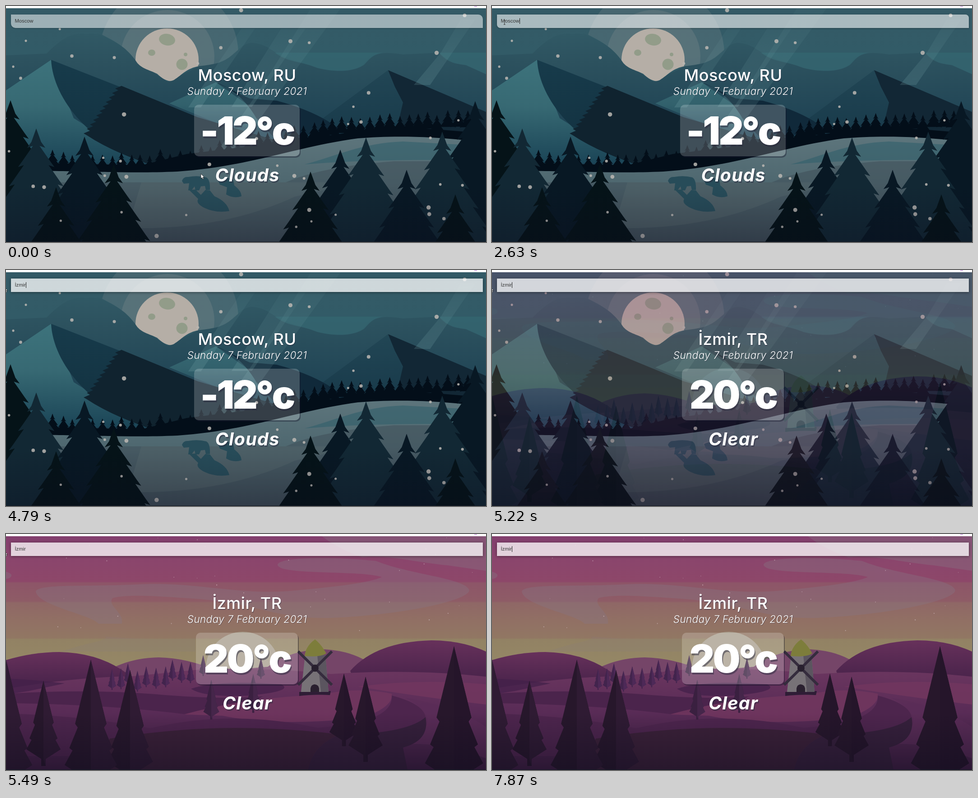
An HTML page for the animation above (8130 ms loop, 1064x526 px).

```html
<!DOCTYPE html>
<html lang="en">
<head>
<meta charset="utf-8">
<title>Weather search</title>
<style>
  html, body { margin: 0; width: 100%; height: 100%; overflow: hidden; background: #fff; }
  #stage { position: relative; width: 1064px; height: 526px; overflow: hidden; }
  svg { position: absolute; left: 0; top: 0; }
  #search {
    position: absolute; left: 11px; top: 19px; width: 1046px; height: 29.5px;
    box-sizing: border-box; padding: 8px 0 0 8.5px; display: flex;
    font: 11.2px/13px "Liberation Sans", Arial, sans-serif; color: #333;
  }
  #query { height: 13px; white-space: pre; }
  #query.picked { background: #0078d7; color: #fff; }
  #caret { width: 1px; height: 13px; background: #222; }
  #panel {
    position: absolute; top: 220px; height: 115px; border-radius: 10px;
    background: rgba(255,255,255,.2); box-shadow: 2px 3px rgba(20,20,40,.38);
  }
  text { font-family: Inter, "Open Sans", sans-serif; fill: #fff; text-anchor: middle; font-optical-sizing: none; }
  #city { font-size: 36px; font-weight: 500; letter-spacing: .5px; filter: drop-shadow(1.5px 2px 0 rgba(40,40,60,.45)); }
  #date { font-size: 22.5px; font-weight: 300; font-style: italic; letter-spacing: .4px; filter: drop-shadow(1px 1.5px 0 rgba(40,40,60,.4)); }
  #temp { font-size: 86px; font-weight: 900; letter-spacing: -4px; filter: drop-shadow(2px 4px 0 rgba(40,40,60,.5)); }
  #sky { font-size: 39.5px; font-weight: 700; font-style: italic; letter-spacing: 1.2px; filter: drop-shadow(2px 3px 0 rgba(40,40,60,.5)); }
</style>
</head>
<body>
<div id="stage">
<svg width="1064" height="526" viewBox="0 0 1064 526">
  <defs>
    <linearGradient id="night" x2="0" y2="1">
      <stop offset="0" stop-color="#345a66"/><stop offset=".2" stop-color="#325b67"/><stop offset=".55" stop-color="#234a5a"/>
    </linearGradient>
    <linearGradient id="ridge" gradientUnits="userSpaceOnUse" x1="0" y1="60" x2="0" y2="290">
      <stop offset="0" stop-color="#315965"/><stop offset=".3" stop-color="#2c515e"/><stop offset="1" stop-color="#1c4052"/>
    </linearGradient>
    <linearGradient id="lit" x2="0" y2="1">
      <stop offset="0" stop-color="#3d737c"/><stop offset=".45" stop-color="#376973"/><stop offset="1" stop-color="#1b4557"/>
    </linearGradient>
    <linearGradient id="slope" x2="0" y2="1">
      <stop offset="0" stop-color="#173b4b"/><stop offset="1" stop-color="#12303f"/>
    </linearGradient>
    <linearGradient id="snow" x2="0" y2="1">
      <stop offset="0" stop-color="#5d757c"/><stop offset=".42" stop-color="#4f6870"/><stop offset="1" stop-color="#3b4a54"/>
    </linearGradient>
    <linearGradient id="beam" x2="0" y2="1">
      <stop offset="0" stop-color="#8ebfc0" stop-opacity=".04"/><stop offset="1" stop-color="#8ebfc0" stop-opacity=".17"/>
    </linearGradient>
    <linearGradient id="dusk" gradientUnits="userSpaceOnUse" x1="0" y1="5" x2="0" y2="320">
      <stop offset="0" stop-color="#833f6e"/><stop offset=".14" stop-color="#8a456d"/><stop offset=".32" stop-color="#8d4769"/>
      <stop offset=".33" stop-color="#8d5568"/><stop offset=".46" stop-color="#8e5c66"/><stop offset=".47" stop-color="#8f6766"/>
      <stop offset=".6" stop-color="#917064"/><stop offset=".72" stop-color="#917763"/><stop offset=".73" stop-color="#928264"/>
      <stop offset="1" stop-color="#968a66"/>
    </linearGradient>
    <linearGradient id="hill" x2="0" y2="1">
      <stop offset="0" stop-color="#67315b"/><stop offset=".6" stop-color="#4f264e"/><stop offset="1" stop-color="#432046"/>
    </linearGradient>
    <linearGradient id="field" x2="0" y2="1">
      <stop offset="0" stop-color="#6b365f"/><stop offset=".4" stop-color="#5a2c57"/><stop offset="1" stop-color="#402043"/>
    </linearGradient>
    <linearGradient id="shade" gradientUnits="userSpaceOnUse" x1="0" y1="400" x2="0" y2="526">
      <stop offset="0" stop-color="#0b0a1c" stop-opacity="0"/><stop offset="1" stop-color="#0b0a1c" stop-opacity=".4"/>
    </linearGradient>
    <clipPath id="view"><rect y="5" width="1064" height="521"/></clipPath>
    <clipPath id="aboveRidge"><path d="M0,5V60H205C250,82 268,95 287,121C298,140 318,142 335,151Q358,173 372,165C392,152 400,139 428,134Q450,132 470,127C500,116 500,108 530,86V5Z"/></clipPath>
  </defs>

  <g clip-path="url(#view)">
    <g id="winter">
      <rect y="5" width="1064" height="521" fill="url(#night)"/>
      <path fill="url(#ridge)" d="M0,110L90,106Q130,64 160,62H205C250,82 268,95 287,121L358,169L428,134Q450,132 470,127C500,116 500,105 530,86Q548,76 580,92C620,120 650,122 690,138C740,150 785,145 800,122C820,100 850,104 880,108L960,104C980,130 1000,128 1020,132L1064,152V400H0Z"/>
      <path fill="#356872" opacity=".65" d="M596,104H838C815,106 806,118 795,130C770,150 720,146 690,138C650,122 625,126 596,104ZM960,104H1064V152L1020,132C1000,128 985,130 960,104Z"/>
      <g clip-path="url(#aboveRidge)">
        <g fill="#c9bcb2" fill-opacity=".13"><circle cx="361" cy="107" r="154"/><circle cx="358" cy="113" r="104"/></g>
        <circle cx="357" cy="120" r="70" fill="#b5aea6"/>
        <g fill="#929c89"><ellipse cx="357" cy="75" rx="18" ry="13" transform="rotate(10 357 75)"/><ellipse cx="323" cy="104" rx="8" ry="7"/><circle cx="398" cy="108" r="4"/><circle cx="390" cy="130" r="12.5"/></g>
      </g>
      <path fill="url(#slope)" opacity=".45" d="M847,143L700,252V320H960Z"/>
      <path fill="#122735" d="M847,143L1064,236V330H860L872,250L880,215L862,180Z"/>
      <path fill="url(#lit)" opacity=".75" d="M465,170L362,217L470,262L620,280Z"/>
      <path fill="#10293a" d="M465,170Q520,190 555,250L600,300L740,275Q690,235 600,211L540,206Z"/>
      <path fill="url(#lit)" d="M100,120L0,188V350H310L150,250Z"/>
      <path fill="url(#slope)" d="M100,120C104,200 175,300 310,350H600V300L425,248Z"/>
      <path id="facet" fill="#10232f"/>
      <g fill="url(#beam)"><path d="M522,50H552L432,226H404Z"/><path d="M676,5H742L520,310L458,340L560,190Z"/><path d="M610,50H664L545,225H500Z"/><path d="M964,104L1008,30H1040L940,176H904Z"/></g>
      <g id="forest" fill="#030e19"><path d="M90,350L300,355L400,330L560,310L700,290L870,268L1064,284V400H90Z"/></g>
      <path fill="url(#snow)" d="M0,367C200,367 260,374 380,369C540,358 640,314 780,295C860,288 960,290 1064,305V526H0Z"/>
      <path fill="#31606b" opacity=".6" d="M662,353C730,335 790,305 880,302L1064,312V344Q820,340 662,353Z"/>
      <path fill="#42545d" opacity=".65" d="M0,393H620Q700,358 860,346H1064V526H0Z"/>
      <path fill="#52656b" opacity=".55" d="M270,495Q480,500 640,425L780,393H300Z"/>
      <g fill="#274c59">
        <path d="M390,390Q393,380 404,381Q425,377 444,382Q453,387 452,410H443L441,401L432,402L428,411H420L418,402L411,411H404L406,395L394,396Z"/>
        <path d="M406,410L420,409L432,421L442,410L452,411L462,424Q490,436 495,457Q465,462 440,450Q420,440 426,430Z"/>
        <path d="M470,388Q490,378 504,388L506,400Q522,412 522,424Q505,430 488,420L490,404L474,398Z"/>
      </g>
      <g id="pines"></g>
      <g id="flakes" fill="#bab7b2" fill-opacity=".86"></g>
      <rect y="400" width="1064" height="126" fill="url(#shade)" opacity=".7"/>
    </g>

    <g id="summer">
      <rect y="5" width="1064" height="521" fill="url(#dusk)"/>
      <g fill="#867684" fill-opacity=".36">
        <path d="M66,128C72,110 190,118 300,112C420,106 520,138 640,126C740,116 800,110 833,96C790,82 650,90 610,76Q590,66 620,59C680,48 780,56 820,60C900,92 1020,98 1027,126C1020,152 860,182 720,187C590,190 560,152 400,143C320,137 260,135 236,143C224,160 262,174 257,200H205C190,180 70,160 66,128Z"/>
        <path d="M790,52C850,46 900,62 980,70L1064,82V5H700Q740,35 790,52Z"/>
        <path d="M0,84Q14,88 12,94Q8,100 0,100Z"/><path d="M175,246Q240,232 215,228Q300,236 420,233V262H120Z" opacity=".45"/>
      </g>
      <g id="stars" fill="#d8c3c9" opacity=".65"></g>
      <circle cx="525" cy="300" r="82" fill="#aaa08f"/>
      <path fill="#754568" d="M215,310Q270,276 338,275Q400,276 470,305L580,296Q630,258 705,257Q790,262 830,310V345H215Z"/>
      <path fill="url(#hill)" d="M0,281Q60,263 118,263Q220,265 285,325L200,360H0Z"/>
      <path fill="url(#hill)" d="M763,305Q820,240 943,237Q1010,237 1064,262V350H780Z"/>
      <path fill="url(#field)" d="M0,345Q160,318 280,317L430,302Q570,296 720,312Q900,300 1064,318V526H0Z"/>
      <path fill="#43214a" opacity=".75" d="M0,322Q70,325 130,333L50,350L0,358ZM410,345Q470,325 610,335Q640,350 540,360Q440,365 410,345Z"/>
      <path fill="#4b244c" d="M0,356Q180,345 330,357Q480,370 570,362Q500,395 400,402Q230,380 0,377Z"/>
      <path fill="#71375f" opacity=".85" d="M395,402Q520,366 700,358Q780,340 855,356Q860,385 790,410Q600,430 480,405ZM780,340Q920,322 1064,335V380Q930,365 780,340Z"/>
      <path fill="#4d254d" d="M0,400Q170,405 320,433Q500,390 690,432Q860,420 855,360Q950,385 925,430Q890,470 720,495H0Z"/>
      <path fill="#5b2d57" opacity=".7" d="M885,365Q1000,385 1064,430V500Q960,460 870,470Q990,420 885,365Z"/>
      <path fill="#3b2138" d="M230,456Q400,428 560,433Q660,436 740,447Q680,470 670,526H200Z"/>
      <path fill="#36203b" d="M740,447Q890,445 930,408Q940,460 880,476L890,526H670Q680,470 740,447Z"/>
      <g id="grove"></g>
      <path fill="#2f1d36" d="M650,352L720,350L718,359Q680,357 650,361Z"/>
      <path fill="#777277" d="M663,270H708L715,352H654Z"/>
      <path fill="#5b555f" d="M690,270H708L715,352H698Z"/>
      <path fill="#7d7d3b" d="M685,235Q698,245 710,266Q698,275 662,272Q664,250 685,235Z"/>
      <path fill="#2a202f" d="M675,352V344Q676,336 684,335Q693,336 694,344V352Z"/>
      <g id="sails" fill="#352c3d"></g>
      <circle cx="685" cy="299" r="8" fill="#28202e"/>
      <g id="cypresses"></g>
      <rect y="400" width="1064" height="126" fill="url(#shade)"/>
    </g>
  </g>
  <rect y="525" width="1064" height="1" fill="#111722"/>
  <rect x="1038" width="6" height="1" fill="#b36ad0"/>
</svg>

<div id="search"><span id="query"></span><i id="caret"></i></div>
<div id="panel"></div>

<svg width="1064" height="526" viewBox="0 0 1064 526">
  <text id="city" x="534.5" y="167"></text>
  <text id="date" x="534.5" y="197.5">Sunday 7 February 2021</text>
  <text id="temp" x="534" y="309"></text>
  <text id="sky" x="535" y="391"></text>
  <path id="arrow" d="M0,0V10.5L2.5,8.3L4.2,12L6,11.2L4.4,7.6H7.6Z" fill="#fff" stroke="#111" stroke-width=".7"/>
  <path id="ibeam" d="M-2,-4.5H2M0,-4.5V4.5M-2,4.5H2" stroke="#333" fill="none"/>
</svg>
</div>

<script>
const LOOP = 8130;
const $ = id => document.getElementById(id);
const clamp = v => Math.min(1, Math.max(0, v));
const smooth = v => (v = clamp(v), v * v * (3 - 2 * v));

function add(parent, tag, attrs) {
  const el = document.createElementNS('http://www.w3.org/2000/svg', tag);
  for (const k in attrs) el.setAttribute(k, attrs[k]);
  $(parent).append(el);
}

let seed = 7;
const rand = (lo = 0, hi = 1) => lo + (hi - lo) * ((seed = seed * 16807 % 2147483647) / 2147483647);

function scatter(parent, count, bottom, radius) {
  for (let i = 0; i < count; i++)
    add(parent, 'circle', { cx: rand(5, 1060), cy: rand(8, bottom), r: radius() });
}

// Mirrors a right-hand outline of [dx, y] points around a vertical axis.
function mirrored(x, side) {
  const right = side.map(([dx, y]) => [x + dx, y]);
  const left = side.map(([dx, y]) => [x - dx, y]).reverse();
  return right.concat(left).map(p => p.map(n => n.toFixed(1))).join(' ');
}

// A conifer that widens at a constant rate, in tiers of equal height.
function pine(parent, x, y, tier, bottom, fill) {
  const side = [[0, y]];
  for (let foot = y + tier; foot < bottom + tier; foot += tier) {
    const reach = .47 * (foot - y);
    side.push([reach - tier * .22, foot - tier * .3], [reach, foot], [reach - tier * .3, foot - tier * .1]);
  }
  add(parent, 'polygon', { points: mirrored(x, side), fill });
}

function cypress(parent, x, y, h, dark, light) {
  const side = [[0, 0], [.6, .53], [.5, .56], [.82, .73], [.7, .75], [1, .87], [.13, .99], [.13, 1.08]]
    .map(([a, b]) => [a * h * .215, y + b * h]);
  add(parent, 'polygon', { points: mirrored(x, side), fill: dark });
  const half = side.map(([dx, v]) => [x + dx, v]).concat([[x, y + h]]);
  add(parent, 'polygon', { points: half.join(' '), fill: light });
}

// Winter
let edge = 'M256,178';
for (let i = 0; i < 11; i++) edge += 'l-14,6l7,4';
$('facet').setAttribute('d', edge + 'Q230,322 310,350H600V300L425,248Z');

for (let x = 103; x < 1060; x += rand(18, 25)) {
  const y = 328 - 90 * smooth((x - 270) / 600) + rand(-8, 8);
  pine('forest', x, y, 13, y + 39, '#030e19');
}

const stand = (fill, ...tips) => tips.forEach(([x, y]) => pine('pines', x, y, 43, 526, fill));
stand('#051318', [10, 210]);
stand('#081824', [1040, 212], [741, 320]);
stand('#122834', [67, 273], [798, 293], [967, 280]);
stand('#081824', [174, 291], [888, 365]);
stand('#051318', [239, 352], [111, 404], [675, 369], [996, 420]);

scatter('flakes', 46, 520, () => 2.5 + 2.3 * rand() ** 1.5);

// Summer
scatter('stars', 34, 225, () => rand(.5, 1.1));
for (let x = 235; x < 420; x += rand(14, 24)) cypress('grove', x, rand(279, 306), 43, '#42244d', '#4d2957');
for (const [x, y, h] of [[437, 270, 43], [565, 276, 43], [548, 312, 80], [455, 325, 82]])
  cypress('grove', x, y, h, '#3a2040', '#45264a');
for (const [x, y, h] of [[83, 327, 176], [749, 311, 150], [797, 318, 176], [275, 303, 235], [0, 280, 270], [188, 280, 270], [993, 250, 300]])
  cypress('cypresses', x, y, h, '#27172b', x < 300 ? '#2f1b33' : '#25152a');
for (let a = 45; a < 360; a += 90)
  add('sails', 'path', { d: 'M682,299V246H676V284H694V246H688V299Z M676,246H694V284H676Z', transform: `rotate(${a} 685 299)` });

// Timeline
const CITY = 'İzmir', KEYS = [3700, 4100, 4390, 4530, 4790];
const SELECT = 2630, FOUND = 5220, FRAME = 130;

// Eased change shown in three held frames.
const threeStep = (t, start) => smooth((Math.floor((t - start) / FRAME) + 1) / 3);

const inOut = p => p < .5 ? 4 * p ** 3 : 1 - 4 * (1 - p) ** 3;
const out2 = p => 1 - (1 - p) ** 2;
const out3 = p => 1 - (1 - p) ** 3;

const HOME = [432, 374];
const moves = [
  { start: 730, dur: 400, to: [423, 370], ex: out3, ey: out3 },
  { start: 1430, dur: 1200, to: [95, 34], ex: inOut, ey: inOut },
  { start: SELECT, dur: 190, to: [-4, 38], ex: out3, ey: out3 },
  { start: 6080, dur: 190, to: [54, 43], ex: out3, ey: out3 },
  { start: 6910, dur: 850, to: [1040, 527], ex: out2, ey: out3 }
];

function pointerAt(t) {
  let [x, y] = HOME;
  for (const { start, dur, to, ex, ey } of moves) {
    if (t < start) break;
    const held = Math.floor((t - start) / 140) * 140 + 60;
    const p = clamp(held / dur);
    x += (to[0] - x) * ex(p);
    y += (to[1] - y) * ey(p);
  }
  return [x, y];
}

function caretOn(t) {
  if (t < KEYS[0]) return t >= SELECT && t < SELECT + FRAME;
  return t < KEYS[4] || Math.floor((t - 4830) / 504) % 2 === 0 || t < 4830;
}

function draw() {
  const t = performance.now() % LOOP;
  const found = t >= FOUND;
  $('summer').style.opacity = threeStep(t, FOUND);
  $('city').textContent = found ? 'İzmir, TR' : 'Moscow, RU';
  $('temp').textContent = found ? '20°c' : '-12°c';
  $('sky').textContent = found ? 'Clear' : 'Clouds';
  const width = found ? 226 : 234;
  $('panel').style.width = width + 'px';
  $('panel').style.left = 534 - width / 2 + 'px';

  const typed = KEYS.filter(k => k <= t).length;
  $('query').textContent = typed ? CITY.slice(0, typed) : 'Moscow';
  $('query').className = !typed && t >= SELECT + FRAME ? 'picked' : '';
  $('caret').style.opacity = caretOn(t) ? 1 : 0;

  const focus = threeStep(t, SELECT), r = 10 * (1 - focus);
  const box = $('search').style;
  box.background = `rgba(255,255,255,${.52 + .24 * focus})`;
  box.borderRadius = `0 ${r}px 0 ${r}px`;
  box.boxShadow = `0 1px ${3 + 3 * focus}px rgba(0,0,0,${.25 + .2 * focus})`;

  const [x, y] = pointerAt(t);
  const overField = x > 11 && y > 19 && y < 48;
  $('arrow').style.display = overField ? 'none' : '';
  $('ibeam').style.display = overField ? '' : 'none';
  $(overField ? 'ibeam' : 'arrow').setAttribute('transform', `translate(${x} ${y})`);
  requestAnimationFrame(draw);
}
draw();
</script>
</body>
</html>
```
